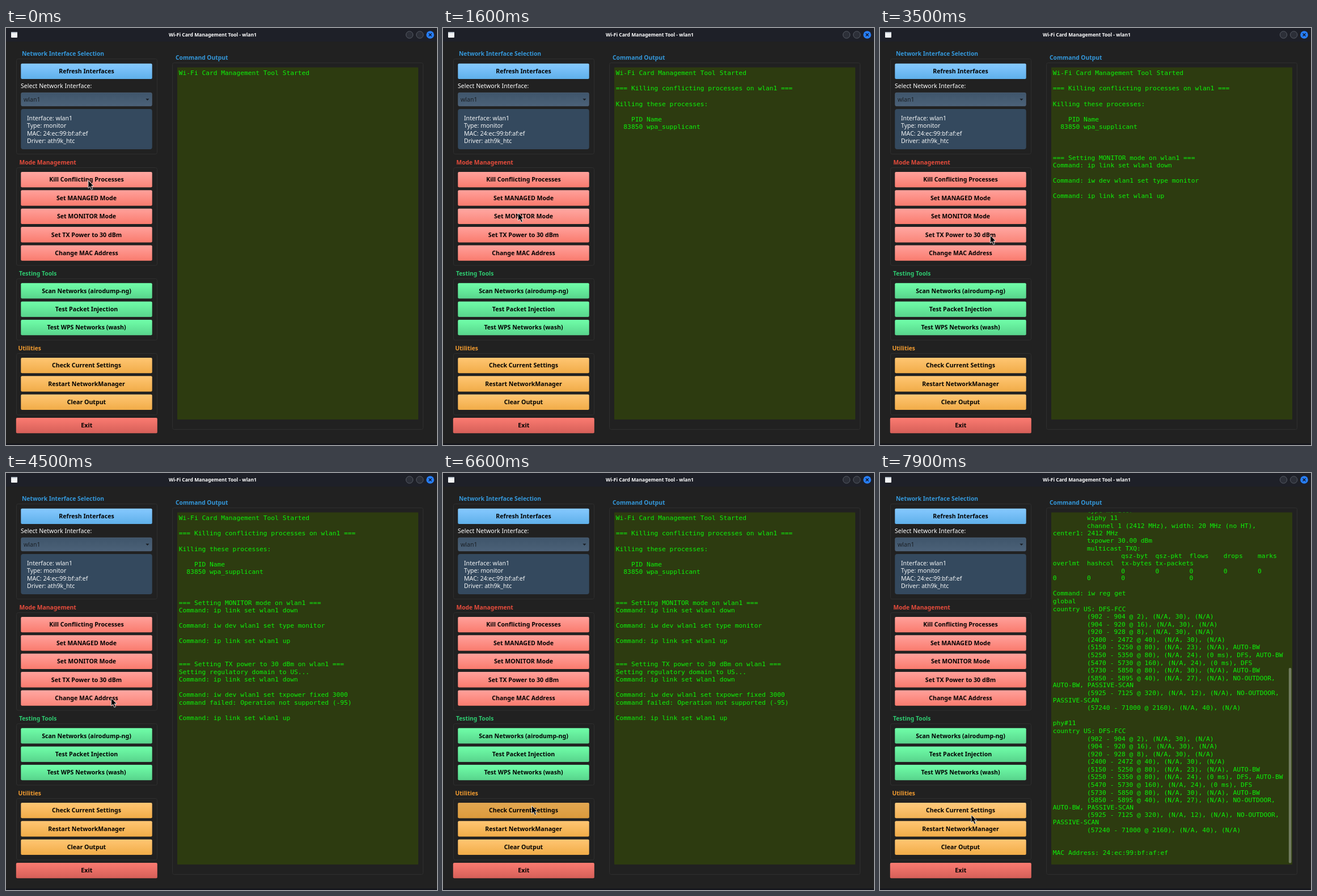
An HTML page that plays this animation: 760 by 736 pixels, repeating every 8000 ms.

```html
<!DOCTYPE html>
<html lang="en">
<head>
<meta charset="utf-8">
<title>Wi-Fi Card Management Tool</title>
<style>
  html, body { margin: 0; width: 100%; height: 100%; overflow: hidden; background: #212121; }
  svg { display: block; width: 760px; height: 736px; }
  text { font: 10.6px "Noto Sans", "Open Sans", sans-serif; white-space: pre; }
  .bold { font-weight: 700; }
  .head { font-weight: 700; font-size: 10.3px; }
  .bar { font-weight: 700; font-size: 8.55px; }
  .mono { font: 11.26px "DejaVu Sans Mono", monospace; fill: #0df20a; }
</style>
</head>
<body>
<svg id="stage" viewBox="0 0 760 736">
  <defs><clipPath id="pane"><rect x="302" y="69.5" width="425" height="621.5"/></clipPath></defs>
</svg>
<script>
const stage = document.getElementById('stage');

function add(tag, attrs, parent = stage) {
  const el = document.createElementNS('http://www.w3.org/2000/svg', tag);
  for (const k in attrs) el.setAttribute(k, attrs[k]);
  parent.appendChild(el);
  return el;
}
function label(x, y, str, fill, cls = '', anchor = 'start', parent = stage) {
  add('text', { x, y, fill, class: cls, 'text-anchor': anchor }, parent).textContent = str;
}
function rect(x, y, width, height, fill, rx = 0, more = {}) {
  return add('rect', { x, y, width, height, fill, rx, ...more });
}
function gradient(id, top, bottom) {
  const g = add('linearGradient', { id, x2: 0, y2: 1 }, stage.querySelector('defs'));
  add('stop', { offset: 0, 'stop-color': top }, g);
  add('stop', { offset: 1, 'stop-color': bottom }, g);
}

gradient('blue', '#86c9ff', '#5fb0ea');
gradient('red', '#ffa19b', '#fa7b6e');
gradient('green', '#70ffa9', '#58d48c');
gradient('orange', '#ffc673', '#f1ac48');
gradient('exit', '#fb7b71', '#d55f58');
gradient('combo', '#3f556b', '#4b6178');

// title bar
rect(0, 0, 760, 24, '#1e2028');
rect(0, 733.5, 760, 2.5, '#15161c');
rect(9, 7, 11, 10, '#f2f4f6', 1);
rect(9, 7, 11, 2, '#b9c2cc', 1);
label(364.5, 15.3, 'Wi-Fi Card Management Tool - wlan1', '#fff', 'bar', 'middle');
for (const cx of [711.5, 729.7])
  add('circle', { cx, cy: 12, r: 6.2, fill: '#2c2f38', stroke: '#5b5f69', 'stroke-width': 0.9 });
add('circle', { cx: 748, cy: 12, r: 6.8, fill: '#277fff' });
add('path', { d: 'M745.5 9.5l5 5m0-5l-5 5', stroke: '#10131c', 'stroke-width': 1.4 });

// group boxes
function group(title, tx, ty, color, x, y, w, h) {
  rect(x, y, w, h, 'none', 3, { stroke: '#2f2f2f' });
  label(tx, ty, title, color, 'head');
}
group('Network Interface Selection', 28, 49, '#3498db', 18.5, 54.5, 248, 168);
group('Mode Management', 23.5, 240.6, '#e74c3c', 18.5, 246.5, 248, 172.5);
group('Testing Tools', 23, 437, '#2ecc71', 18.5, 442.5, 248, 108.5);
group('Utilities', 21.5, 568.6, '#f39c30', 18.5, 574.5, 248, 108.5);
group('Command Output', 299, 56, '#3498db', 293.5, 61.5, 442, 647);

// buttons
const buttons = [];
function button(str, y, hue, x = 26.3, w = 231.4) {
  rect(x, y, w, 27.3, `url(#${hue})`, 2);
  const shade = rect(x, y, w, 27.3, '#fff', 2, { opacity: 0 });
  label(x + w / 2, y + 17.4, str, '#000', 'bold', 'middle');
  buttons.push({ x, y, w, shade });
}
function column(y, hue, names) {
  names.forEach((name, i) => button(name, y + i * 32.37, hue));
}
column(62.7, 'blue', ['Refresh Interfaces']);
column(254, 'red', ['Kill Conflicting Processes', 'Set MANAGED Mode', 'Set MONITOR Mode',
  'Set TX Power to 30 dBm', 'Change MAC Address']);
column(450.3, 'green', ['Scan Networks (airodump-ng)', 'Test Packet Injection', 'Test WPS Networks (wash)']);
column(582, 'orange', ['Check Current Settings', 'Restart NetworkManager', 'Clear Output']);
button('Exit', 688, 'exit', 17.8, 249);

// interface picker and details
label(26, 106, 'Select Network Interface:', '#fff');
rect(26.8, 114.3, 230.4, 23.4, 'url(#combo)', 2, { stroke: '#53687d', 'stroke-width': 0.8 });
label(31, 130, 'wlan1', '#1a1f25');
add('path', { d: 'M246.3 124.8h6.2l-3.1 3.2z', fill: '#1a1f25' });
rect(26.3, 143, 231.4, 71, '#34495e', 4);
['Interface: wlan1', 'Type: monitor', 'MAC: 24:ec:99:bf:af:ef', 'Driver: ath9k_htc']
  .forEach((str, i) => label(37, 162.5 + i * 13.5, str, '#f4f6f7'));

// output pane
rect(302, 69.5, 425, 621.5, '#2d3b10', 1);
const LINE = 13.57, WRAP = 12.7, TAB = 60.2;

// Lines starting with ">" continue a wrapped line and sit closer to it.
function block(start, lines) {
  const g = add('g', { 'clip-path': 'url(#pane)' });
  let y = start;
  lines.forEach((line, i) => {
    const wrapped = line[0] === '>';
    if (i) y += wrapped ? WRAP : LINE;
    line.slice(wrapped ? 1 : 0).split('\t').forEach((cell, col) => {
      if (cell) label(304.8 + col * TAB, y, cell, '#0df20a', 'mono', 'start', g);
    });
  });
  return g;
}
const at = row => 83.3 + row * LINE;
const rules = [
  'country US: DFS-FCC',
  '\t(902 - 904 @ 2), (N/A, 30), (N/A)',
  '\t(904 - 920 @ 16), (N/A, 30), (N/A)',
  '\t(920 - 928 @ 8), (N/A, 30), (N/A)',
  '\t(2400 - 2472 @ 40), (N/A, 30), (N/A)',
  '\t(5150 - 5250 @ 80), (N/A, 23), (N/A), AUTO-BW',
  '\t(5250 - 5350 @ 80), (N/A, 24), (0 ms), DFS, AUTO-BW',
  '\t(5470 - 5730 @ 160), (N/A, 24), (0 ms), DFS',
  '\t(5730 - 5850 @ 80), (N/A, 30), (N/A), AUTO-BW',
  '\t(5850 - 5895 @ 40), (N/A, 27), (N/A), NO-OUTDOOR,',
  '>AUTO-BW, PASSIVE-SCAN',
  '\t(5925 - 7125 @ 320), (N/A, 12), (N/A), NO-OUTDOOR,',
  '>PASSIVE-SCAN',
  '\t(57240 - 71000 @ 2160), (N/A, 40), (N/A)',
  ''
];
const END = 8000, REPORT = 6700, UNFROZEN = 600;
const outputs = [
  { from: 0, to: REPORT, el: block(at(0), ['Wi-Fi Card Management Tool Started']) },
  { from: UNFROZEN, to: REPORT, el: block(at(2), [
    '=== Killing conflicting processes on wlan1 ===', '',
    'Killing these processes:', '', '    PID Name', '  83850 wpa_supplicant']) },
  { from: 1900, to: REPORT, el: block(at(11), [
    '=== Setting MONITOR mode on wlan1 ===', 'Command: ip link set wlan1 down', '',
    'Command: iw dev wlan1 set type monitor', '', 'Command: ip link set wlan1 up']) },
  { from: 3700, to: REPORT, el: block(at(19), [
    '=== Setting TX power to 30 dBm on wlan1 ===', 'Setting regulatory domain to US...',
    'Command: ip link set wlan1 down', '', 'Command: iw dev wlan1 set txpower fixed 3000',
    'command failed: Operation not supported (-95)', '', 'Command: ip link set wlan1 up']) },
  { from: REPORT, to: END, el: block(at(-1) + 0.1, [
    '\ttype monitor', '\twiphy 11', '\tchannel 1 (2412 MHz), width: 20 MHz (no HT),',
    '>center1: 2412 MHz', '\ttxpower 30.00 dBm', '\tmulticast TXQ:',
    '\t\tqsz-byt\tqsz-pkt\tflows\tdrops\tmarks', '>overlmt\thashcol\ttx-bytes\ttx-packets',
    '\t\t0\t0\t0\t0\t0', '>0\t0\t0\t\t0', '', 'Command: iw reg get', 'global',
    ...rules, 'phy#11', ...rules, '', 'MAC Address: 24:ec:99:bf:af:ef']) },
  { from: REPORT, to: END, el: rect(720.8, 344, 4.6, 344.5, '#727c60', 2) }
];

const cursor = add('path', {
  d: 'M0 0V13.6L3.1 10.8L5.4 16.2L7.8 15.2L5.5 9.9H9.6Z',
  fill: '#000', stroke: '#fff', 'stroke-width': 0.8, 'stroke-linejoin': 'round'
});

// pointer path: time, x, y of the tip
const path = [
  [0, 145, 269], [200, 145, 269], [300, 145, 291], [400, 145, 291], [1300, 132.5, 326.5],
  [2500, 132.5, 326.5], [2600, 143.5, 314], [2700, 150, 306], [3200, 190, 374], [3300, 194.5, 366],
  [4400, 194.5, 366], [4900, 150, 523], [5100, 142, 474], [5200, 142, 474], [5500, 150, 624],
  [5900, 150, 624], [6000, 153, 575], [6100, 153, 575], [6300, 156.5, 587.5], [7200, 156.5, 587.5],
  [7500, 150, 676], [7700, 164, 560], [7900, 161, 603.5], [END, 161, 603.5]
];
const presses = [[1500, 1600], [3400, 3500], [6500, 6700]];

function pointer(t) {
  const i = path.findIndex(p => p[0] > t);
  const [t0, x0, y0] = path[i - 1], [t1, x1, y1] = path[i];
  const k = (t - t0) / (t1 - t0);
  return [x0 + (x1 - x0) * k, y0 + (y1 - y0) * k];
}

function draw(now) {
  const t = Math.floor(now % END / 100) * 100;
  const [x, y] = pointer(t);
  cursor.setAttribute('transform', `translate(${x} ${y})`);

  // the window ignores the pointer while its first command runs
  const [hx, hy] = t < UNFROZEN ? pointer(0) : [x, y];
  const down = presses.some(([a, b]) => t >= a && t < b);
  for (const b of buttons) {
    const over = hx > b.x && hx < b.x + b.w && hy > b.y && hy < b.y + 27.3;
    b.shade.setAttribute('fill', down ? '#c88a30' : '#fff');
    b.shade.setAttribute('opacity', over ? (down ? 0.5 : 0.07) : 0);
  }
  for (const o of outputs)
    o.el.setAttribute('visibility', t >= o.from && t < o.to ? 'visible' : 'hidden');
  requestAnimationFrame(() => draw(performance.now()));
}
draw(performance.now());
</script>
</body>
</html>
```
